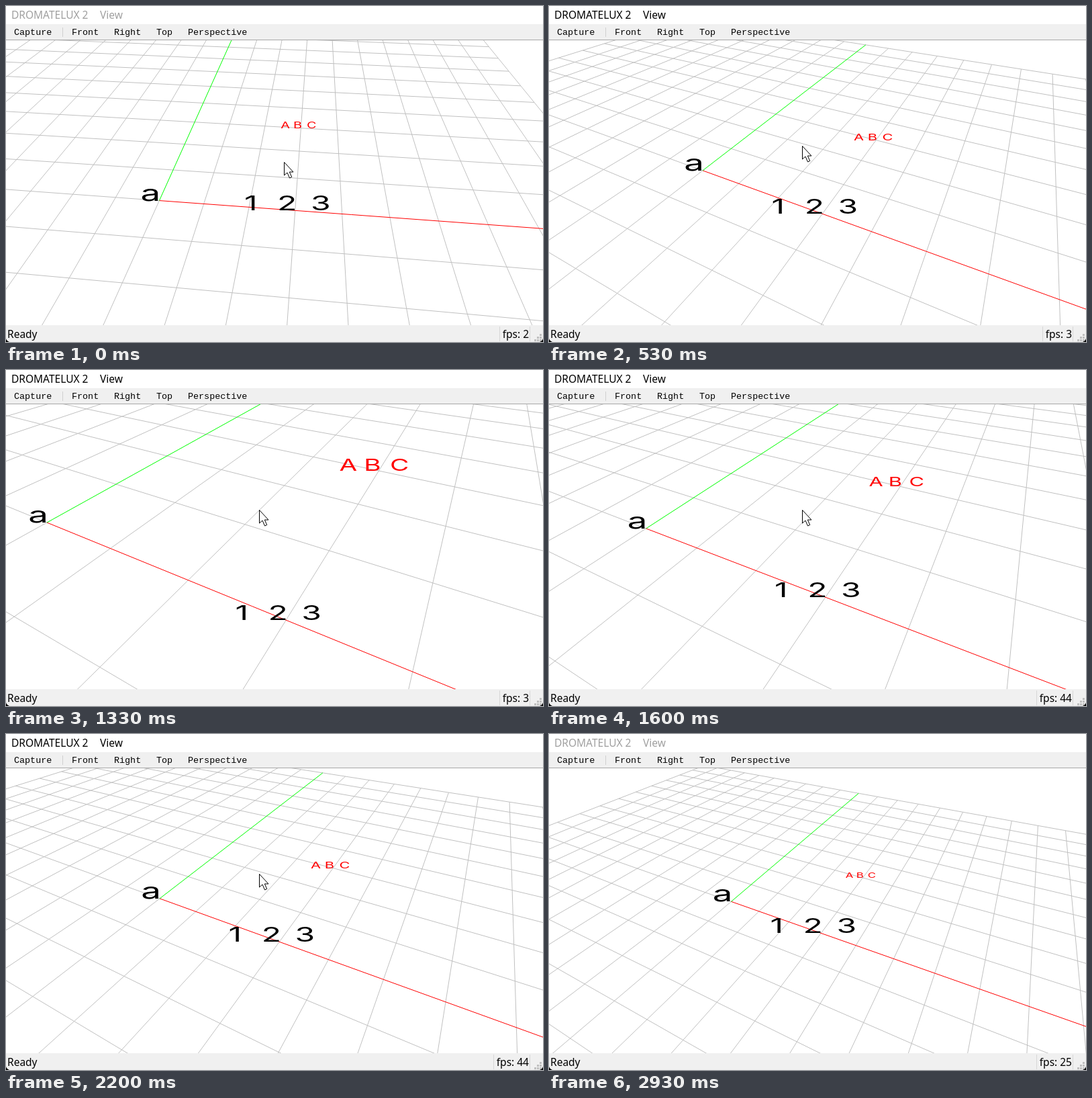
An HTML page with a canvas for the animation above (3070 ms loop, 800 px wide and 500 px high).

```html
<!DOCTYPE html>
<html lang="en">
<head>
<meta charset="utf-8">
<title>3D view</title>
<style>
html, body { margin: 0; width: 100%; height: 100%; overflow: hidden; background: #000; }
#win { position: relative; width: 800px; height: 500px; overflow: hidden; background: #fff;
  border-radius: 0 0 7px 7px; font: 15.5px/24px "Noto Sans", "Open Sans", sans-serif; color: #000; }
#win * { position: absolute; top: 0; left: 0; white-space: pre; }
#win #title { top: 1px; }
#title.idle { color: #a0a0a0; }
#win #menu { top: 27px; width: 800px; height: 23px; background: #f0f0f0; border-bottom: 1px solid #a8a8a8;
  font: 13.4px/26px "Liberation Mono", monospace; }
#win #menu i { left: 84px; top: 5px; width: 1px; height: 14px; background: #d0d0d0; }
#win canvas { top: 51px; }
#win #status { top: 475px; width: 800px; height: 25px; background: #f0f0f0; }
#win #ready { left: 2px; top: 1px; }
#win #fps { left: auto; right: 19px; top: 2px; height: 22px; line-height: 22px; padding: 0 1px 0 4px;
  border: solid #d7d7d7; border-width: 0 1px; }
#win #grip { left: 795px; top: 13px; width: 3px; height: 3px; background: #bfbfbf;
  box-shadow: 0 4px #bfbfbf, -4px 4px #bfbfbf, 0 8px #bfbfbf, -4px 8px #bfbfbf, -8px 8px #bfbfbf; }
svg { overflow: visible; }
path { fill: #fff; stroke: #000; }
</style>
</head>
<body>
<div id="win">
  <div id="title"><span style="left:8px">DROMATELUX 2</span><span style="left:140px">View</span></div>
  <div id="menu">
    <span style="left:12px">Capture</span><i></i>
    <span style="left:98px">Front</span><span style="left:161px">Right</span>
    <span style="left:224px">Top</span><span style="left:271px">Perspective</span>
  </div>
  <canvas id="view" width="800" height="424"></canvas>
  <div id="status"><span id="ready">Ready</span><span id="fps"></span><b id="grip"></b></div>
  <svg width="1" height="1"><path id="cursor"/></svg>
</div>
<script>
const $ = id => document.getElementById(id);
const ctx = $('view').getContext('2d');
const LOOP = 3070, FOCAL = 512, HALF = 10, NEAR = 0.1, RAD = Math.PI / 180;
const TARGET = [2.478, 0.8];
const CHANGES = [70, 130, 200, 270, 330, 400, 470, 530, 670, 730, 800, 1070, 1130, 1330, 1400,
  1600, 1670, 1930, 2000, 2200, 2270, 2330, 2400, 2470, 2530, 2930];
const ARROW = 'M.5 .5V20l4.5-4 3.5 8 3.2-1.5-3.4-7.5H14z';
const MOVE = 'M0-14L5.5-8H2V-2H8V-5.5L14 0 8 5.5V2H2V8H5.5L0 14-5.5 8H-2V2H-8V5.5L-14 0-8-5.5V-2H-2V-8H-5.5z';

let cam;

// Ground point to camera space: right, up, depth
function toCam(x, y) {
  const dx = x - TARGET[0], dy = y - TARGET[1];
  const u = dx * Math.cos(cam.yaw) + dy * Math.sin(cam.yaw);
  const v = dy * Math.cos(cam.yaw) - dx * Math.sin(cam.yaw);
  return [u, v * Math.sin(cam.pitch), cam.dist + v * Math.cos(cam.pitch)];
}

const toScreen = ([u, v, w]) => [400 + FOCAL * u / w, 212 - FOCAL * v / w];

function clipNear(p, q) {
  if (p[2] >= NEAR) return p;
  const k = (NEAR - p[2]) / (q[2] - p[2]);
  return p.map((c, i) => c + (q[i] - c) * k);
}

function line(x1, y1, x2, y2, color) {
  const p = toCam(x1, y1), q = toCam(x2, y2);
  if (p[2] < NEAR && q[2] < NEAR) return;
  ctx.strokeStyle = color;
  ctx.beginPath();
  ctx.moveTo(...toScreen(clipNear(p, q)));
  ctx.lineTo(...toScreen(clipNear(q, p)));
  ctx.stroke();
}

// Wide letters facing the screen; each entry is [letter, offset from the anchor]
function label(x, y, size, color, letters, worldSized) {
  const p = toCam(x, y), [sx, sy] = toScreen(p), k = worldSized ? 1 / p[2] : 1;
  ctx.fillStyle = color;
  ctx.textAlign = 'center';
  ctx.font = `${size}px Inter, Roboto, sans-serif`;
  for (const [letter, offset] of letters) {
    ctx.save();
    ctx.translate(sx + offset * k, sy);
    ctx.scale(1.6 * k, k);
    ctx.fillText(letter, 0, 0);
    ctx.restore();
  }
}

function drawScene() {
  ctx.clearRect(0, 0, 800, 424);
  for (let i = -HALF; i <= HALF; i++) {
    line(i, -HALF, i, i ? HALF : 0, '#c0c0c0');
    line(-HALF, i, i ? HALF : 0, i, '#c0c0c0');
  }
  line(0, 0, HALF, 0, '#f00');
  line(0, 0, 0, HALF, '#0f0');
  label(0, 0, 33, '#000', [['a', -13]]);
  label(3, 0, 30, '#000', [['1', -66], ['2', -12], ['3', 38]]);
  label(3, 3, 118, '#f00', [['A', -222], ['B', -46], ['C', 150]], true);
}

function drawCursor(step, turn, s) {
  const moving = step > 0 && step < 8;
  let x = 414 - turn / 0.595, y = 232 + 8.57 * s - 1.714 * s * s;
  if (step === 24) y = 480;
  $('cursor').setAttribute('d', moving ? MOVE : ARROW);
  $('cursor').setAttribute('transform', `translate(${Math.round(x)} ${Math.round(y)})`);
  $('cursor').style.display = step > 24 ? 'none' : '';
}

let shown = -1;
function frame(now) {
  const t = now % LOOP;
  const step = CHANGES.filter(c => c <= t).length;
  if (step !== shown) {
    shown = step;
    const s = Math.min(step, 7);                 // orbit drag
    const turn = 2.15 * s + 0.1415 * s * s;
    const notch = step < 14 ? Math.min(7, 14 - step) : Math.min(10, step - 14);  // wheel zoom
    cam = {
      yaw: (5.5 + turn) * RAD,
      pitch: (44.8 + 0.357 * s - 0.171 * s * s) * RAD,
      dist: 3.54 + 0.635 * notch
    };
    drawScene();
    drawCursor(step, turn, s);
    $('title').className = step % 26 ? '' : 'idle';
    $('fps').textContent = 'fps: ' + (step < 3 ? 2 : step < 15 ? 3 : step < 26 ? 44 : 25);
  }
  requestAnimationFrame(frame);
}
requestAnimationFrame(frame);
</script>
</body>
</html>
```
